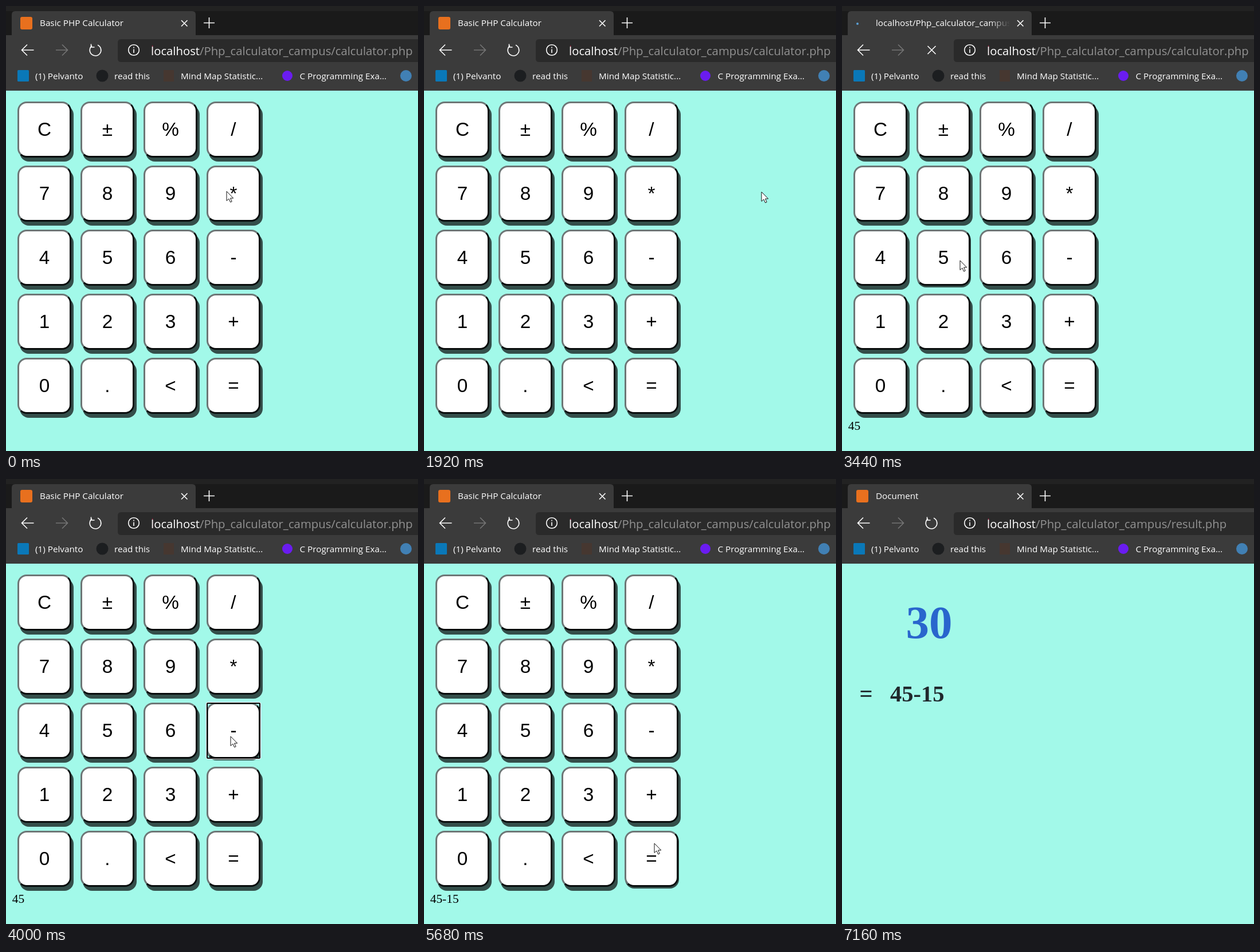
Recreate the animation shown at these times as an HTML page. Size 719 by 778 pixels, loop 7.2 s.

```html
<!DOCTYPE html>
<html lang="en">
<head>
<meta charset="utf-8">
<title>Calculator</title>
<style>
  html, body { margin: 0; width: 100%; height: 100%; overflow: hidden; background: #a2f9e9; }
  #stage { position: absolute; left: 0; top: 0; width: 719px; height: 778px; overflow: hidden; }
  svg { position: absolute; left: 0; top: 0; }
  .key {
    position: absolute; box-sizing: border-box; width: 94px; height: 98px;
    display: flex; align-items: center; justify-content: center;
    border: 3px solid; border-color: #6d7676 #080c0c #080c0c #6d7676; border-radius: 16px;
    background: #fff; color: #000; box-shadow: 4px 7px 0 #344e4a;
    font: 33.3px "Liberation Sans", Arial, sans-serif;
  }
  .key.hover { box-shadow: 1px 3px 0 #344e4a; }
  .key.focus::after {
    content: ""; position: absolute; inset: -3px; border: 2px solid #000;
    border-radius: 2px; box-shadow: 0 0 0 1px #fff;
  }
  .ui { font: 15.25px "Open Sans", "Noto Sans", sans-serif; fill: #fff; white-space: pre; }
  .url { font-size: 20.3px; fill: #929292; }
  .url .host { fill: #fff; }
  .serif { font-family: "Liberation Serif", "Times New Roman", serif; }
  .line { fill: none; stroke: #fff; stroke-width: 1.6; }
</style>
</head>
<body>
<div id="stage">
  <div id="keys"></div>
  <svg width="719" height="778" viewBox="0 0 719 778">
    <defs>
      <linearGradient id="fade">
        <stop offset="0" stop-color="#3b3b3b" stop-opacity="0"/>
        <stop offset="1" stop-color="#3b3b3b"/>
      </linearGradient>
      <clipPath id="titleBox"><rect x="58" y="12" width="235" height="36"/></clipPath>
    </defs>

    <!-- browser frame -->
    <rect width="719" height="52" fill="#1a1a1a"/>
    <rect width="719" height="9" fill="#222"/>
    <path d="M10 52V15q0-6 6-6H325q6 0 6 6V52z" fill="#3b3b3b"/>
    <rect y="51" width="719" height="97" fill="#3b3b3b"/>
    <path d="M719 58H201q-6 0-6 6V92q0 6 6 6H719z" fill="#2a2a2a"/>

    <!-- tab -->
    <rect id="icon" x="25" y="19" width="21" height="22" rx="3" fill="#e8701e"/>
    <circle id="spinner" r="2" fill="#5a9fd4"/>
    <g clip-path="url(#titleBox)">
      <text id="title" class="ui" x="59" y="35"></text>
      <rect x="258" y="14" width="35" height="32" fill="url(#fade)"/>
    </g>
    <path class="line" d="M306 25l10.500 10.500M316.500 25l-10.500 10.500M345 29.500h19M354.500 20v19"/>

    <!-- toolbar -->
    <path class="line" d="M48.500 77H28M37 67.500L27.500 77l9.500 9.500"/>
    <path class="line" d="M87 77h20.500M98 67.500l9.500 9.500l-9.500 9.500" style="stroke:#767676"/>
    <path id="reload" class="line" d="M150 69.500A9.800 9.800 0 1 0 160 68.300M148.500 66.500v5.500h6"/>
    <path id="stop" class="line" d="M149.500 70l14 14M163.500 70l-14 14"/>
    <circle class="line" cx="223" cy="77" r="9.300"/>
    <path class="line" d="M223 75.500v6.500M223 71.500v2"/>
    <rect x="255" y="69" width="1.200" height="17" fill="#b0284a"/>
    <text class="ui url" x="253" y="85.500"><tspan class="host">localhost</tspan>/Php_calculator_campus/<tspan id="file"></tspan></text>

    <!-- bookmarks -->
    <rect x="20" y="112" width="20" height="20" rx="1.500" fill="#0a78b8"/>
    <circle cx="168" cy="122" r="10.500" fill="#1c1e20"/>
    <rect x="275" y="112" width="18" height="20" fill="#463730"/>
    <circle cx="491" cy="122" r="9" fill="#6a1cf0"/>
    <circle cx="698" cy="122" r="10" fill="#4180b4"/>
    <g class="ui">
      <text x="51" y="127.500">(1) Pelvanto</text>
      <text x="189" y="127.500">read this</text>
      <text x="305" y="127.500">Mind Map  Statistic...</text>
      <text x="512.500" y="127.500">C Programming Exa...</text>
    </g>

    <!-- page text -->
    <text id="value" class="serif" x="10.700" y="741" font-size="21.400"></text>
    <g id="result" class="serif" font-weight="bold" fill="#20282c" font-size="40.500">
      <text x="111.500" y="278" font-size="81" fill="#2966cd">30</text>
      <text x="30.500" y="389">=</text>
      <text x="84" y="389">45-15</text>
    </g>

    <path id="cursor" d="M0 0V16.500L3.900 13L6.600 19L9.200 17.900L6.600 12H11.700z"
      fill="#fff" stroke="#111" stroke-width="1"/>
  </svg>
</div>
<script>
const LOOP = 7200, STEP = 40;
const $ = id => document.getElementById(id);

const keys = [..."C±%/789*456-123+0.<="].map((label, i) => {
  const el = document.createElement("div");
  const x = 20 + 110 * (i % 4), y = 166.5 + 112.2 * Math.floor(i / 4);
  el.textContent = label;
  el.style.left = x + "px";
  el.style.top = Math.round(y) + "px";
  $("keys").append(el);
  return { el, label, x, y };
});

// pointer stops: time, x, y
const path = [
  [40, 385, 324], [760, 589, 325], [2280, 589, 325], [2680, 71, 473],
  [2900, 71, 473], [3240, 206, 445], [3600, 206, 445], [3960, 392, 450],
  [4140, 392, 450], [4600, 46, 566], [4800, 46, 566], [5100, 190, 455],
  [5300, 190, 455], [5640, 402, 637], [5960, 402, 637], [6120, 402, 632],
  [6680, 725, 600]
];

// mouse presses: time, key, text after the page reloads
const presses = [
  [2780, "4", "4"], [3240, "5", "45"], [4000, "-", "45-"],
  [4640, "1", "45-1"], [5160, "5", "45-15"], [5820, "=", ""]
];
const LOAD = 120, SHOW = 160, DONE = 340;

function pointer(t) {
  const i = path.findIndex(p => p[0] > t);
  if (i === 0) return path[0].slice(1);
  if (i < 0) return path[path.length - 1].slice(1);
  const [t0, x0, y0] = path[i - 1], [t1, x1, y1] = path[i];
  const u = (t - t0) / (t1 - t0), e = u * u * (3 - 2 * u);
  return [x0 + (x1 - x0) * e, y0 + (y1 - y0) * e];
}

const show = (id, on) => { $(id).style.display = on ? "" : "none"; };

function render(t) {
  const [x, y] = pointer(t);
  $("cursor").setAttribute("transform", `translate(${x} ${y})`);

  const shown = presses.filter(p => t >= p[0] + SHOW).pop();
  const focus = presses.find(p => t >= p[0] && t < p[0] + SHOW);
  const loading = presses.some(p => t >= p[0] + LOAD && t < p[0] + DONE);
  const result = !!shown && shown[1] === "=";

  for (const k of keys) {
    const over = t >= STEP * 2 && x >= k.x && x < k.x + 94 && y >= k.y && y < k.y + 98;
    const held = over && focus && focus[1] === k.label;
    k.el.className = "key" + (over ? " hover" : "") + (held ? " focus" : "");
  }

  show("keys", !result);
  show("result", result);
  show("icon", !loading);
  show("spinner", loading);
  show("reload", !loading);
  show("stop", loading);

  const a = Math.PI * (1 + (t - 3440) / 400);
  $("spinner").setAttribute("cx", 35 + 8 * Math.cos(a));
  $("spinner").setAttribute("cy", 31 + 8 * Math.sin(a));

  const file = result ? "result.php" : "calculator.php";
  $("file").textContent = file;
  $("value").textContent = shown ? shown[2] : "";
  $("title").textContent = loading ? "localhost/Php_calculator_campus/" + file
    : result ? "Document" : "Basic PHP Calculator";
}

function tick() {
  const t = performance.now() % LOOP;
  render(Math.floor(t / STEP) * STEP);
  requestAnimationFrame(tick);
}
tick();
</script>
</body>
</html>
```
